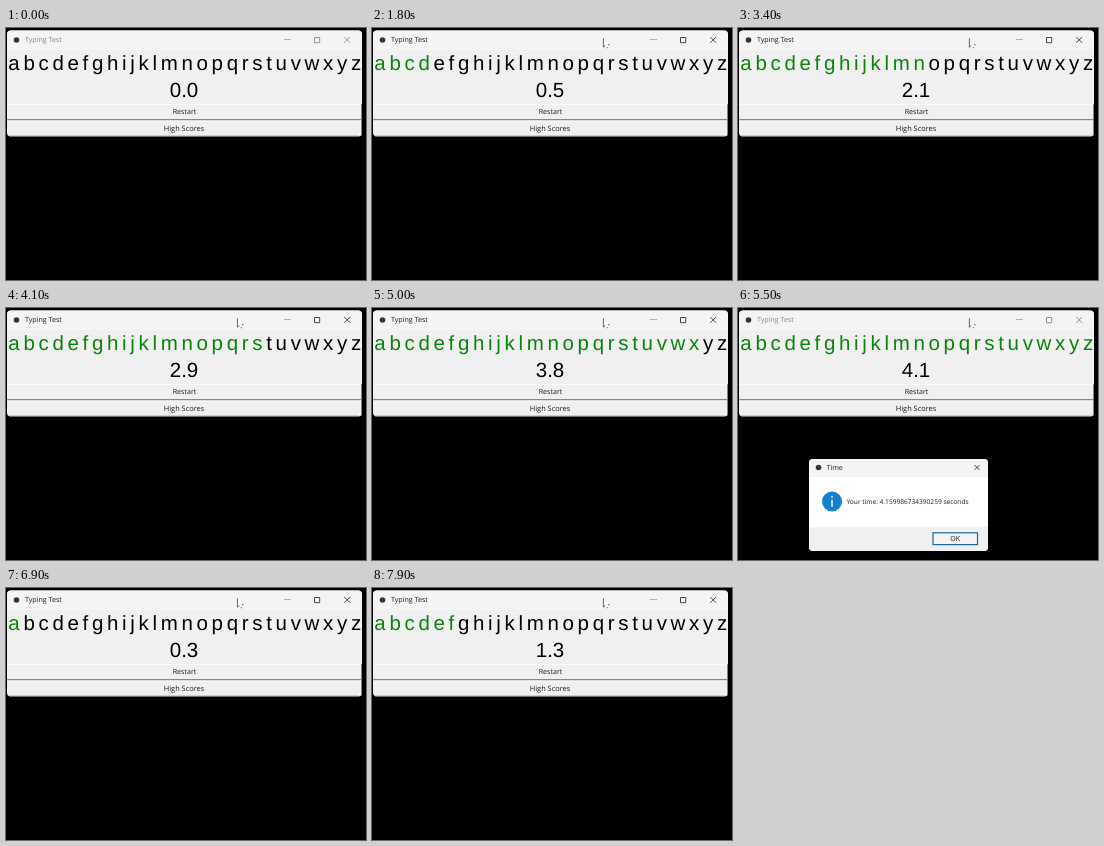
These frames come from a looping animation (360x252 px, 8 s). An HTML page:

```html
<!DOCTYPE html>
<html lang="en">
<head>
<meta charset="utf-8">
<title>Typing Test</title>
<style>
  html, body { margin: 0; width: 100%; height: 100%; overflow: hidden; background: #000; }
  svg { display: block; width: 360px; height: 252px; }
  text { font: 7.1px "Open Sans", "Noto Sans", sans-serif; fill: #1a1a1a; text-rendering: geometricPrecision; }
  .big { font: 20.5px "Liberation Sans", Arial, sans-serif; fill: #000; }
  .letters { letter-spacing: 3.675px; font-kerning: none; }
  .done { fill: #0a850a; }
  .mid { text-anchor: middle; }
  .line { fill: none; stroke: #333; stroke-width: .9; }
  .inactive text { fill: #888; }
  .inactive .line { stroke: #888; }
</style>
</head>
<body>
<svg viewBox="0 0 360 252">
  <rect x="1" y="2.5" width="355" height="106" rx="4" fill="#f0f0f0"/>
  <path d="M1 22V6.5a4 4 0 0 1 4-4H352a4 4 0 0 1 4 4V22z" fill="#f4f4f4"/>
  <g id="bar">
    <circle cx="10.5" cy="12" r="2.8" fill="#30343c"/>
    <text x="19" y="14.4">Typing Test</text>
    <path d="M278 11.5h7" class="line" style="stroke:#aaa"/>
    <path d="M308.5 9.5h5.2v5.2h-5.2zM338.3 9l5.8 5.8m0-5.8l-5.8 5.8" class="line"/>
  </g>
  <text class="big letters" x="2.35" y="42.4"><tspan class="done" id="done"></tspan><tspan id="rest"></tspan></text>
  <text class="big mid" x="178" y="69.4" id="clock"></text>
  <path d="M1 76.5h354M1 93h354" stroke="#fafafa"/>
  <path d="M1 91.7h354.5" stroke="#707070"/>
  <path d="M355.5 76v31.5M3 108.2h350" stroke="#777" stroke-width=".9"/>
  <text class="mid" x="178.5" y="86.4">Restart</text>
  <text class="mid" x="178" y="103.1" style="font-size:7.4px">High Scores</text>

  <g id="dialog">
    <rect x="71" y="151" width="179" height="92" rx="4" fill="#fff"/>
    <path d="M71 219h179v20a4 4 0 0 1-4 4H75a4 4 0 0 1-4-4z" fill="#f0f0f0"/>
    <path d="M71 169V155a4 4 0 0 1 4-4h171a4 4 0 0 1 4 4v14z" fill="#f4f4f4"/>
    <circle cx="80.5" cy="159.5" r="2.8" fill="#30343c"/>
    <text x="88.5" y="162">Time</text>
    <path d="M236.5 157l5 5m0-5l-5 5" class="line"/>
    <circle cx="94" cy="193.5" r="10" fill="#1680cf"/>
    <path d="M94 191.8v7M94 188v1.7" stroke="#fff" stroke-width="1.4"/>
    <text x="108.5" y="196.2" style="font-size:6.6px">Your time: 4.159986734390259 seconds</text>
    <rect x="195" y="224.8" width="44.5" height="11.8" fill="#f4f4f4" stroke="#1c669c" stroke-width="1.2"/>
    <text class="mid" x="217.3" y="233.3">OK</text>
  </g>
  <!-- pale pointer, outlined only along its left and lower edges -->
  <g id="cursor">
    <path d="M0 0v9.2l2.2-2 1.5 3.3 1.5-.7-1.5-3.2h3z" fill="#fafafa"/>
    <path d="M.4 .3v8.9l2-1.8M3.6 9.9l1.2-.4M5 6.6h1.6" fill="none" stroke="#444" stroke-width=".8"/>
  </g>
</svg>
<script>
const alphabet = "abcdefghijklmnopqrstuvwxyz";
const el = id => document.getElementById(id);
const LOOP = 8000, STEP = 100, OPEN = 5400, CLOSE = 6200;

// Each run: timer start in ms, and key press times in tenths of a second
const runs = [
  { start: 1300, keys: [12, 14, 16, 18, 21, 23, 24, 25, 27, 30, 31, 32, 33, 34, 35, 36, 38,
                        39, 41, 43, 44, 46, 48, 49, 51, 53] },
  { start: 6600, keys: [66, 70, 75, 76, 78, 79] }
];

function draw(now) {
  const t = Math.floor(now % LOOP / STEP) * STEP;
  const run = runs[t < CLOSE ? 0 : 1];
  const typed = run.keys.filter(k => k * 100 <= t).length;
  const seconds = Math.min(4.15, Math.max(0, (t - run.start) * 1.04 / 1000));

  el("done").textContent = alphabet.slice(0, typed);
  el("rest").textContent = alphabet.slice(typed);
  el("clock").textContent = (Math.floor(seconds * 10) / 10).toFixed(1);

  const open = t >= OPEN && t < CLOSE, fading = t === CLOSE;
  el("bar").setAttribute("class", t < 800 || open ? "inactive" : "");
  el("dialog").setAttribute("opacity", open ? 1 : fading ? .43 : 0);
  el("dialog").setAttribute("transform", fading ? "translate(1 .8)" : "");

  const away = Math.max(0, 900 - t) / 300;
  el("cursor").setAttribute("opacity", t < 600 ? 0 : 1);
  el("cursor").setAttribute("transform", `translate(${231 + 6 * away} ${10 + 20 * away})`);
  requestAnimationFrame(() => draw(performance.now() - origin));
}
const origin = performance.now();
draw(0);
</script>
</body>
</html>
```
